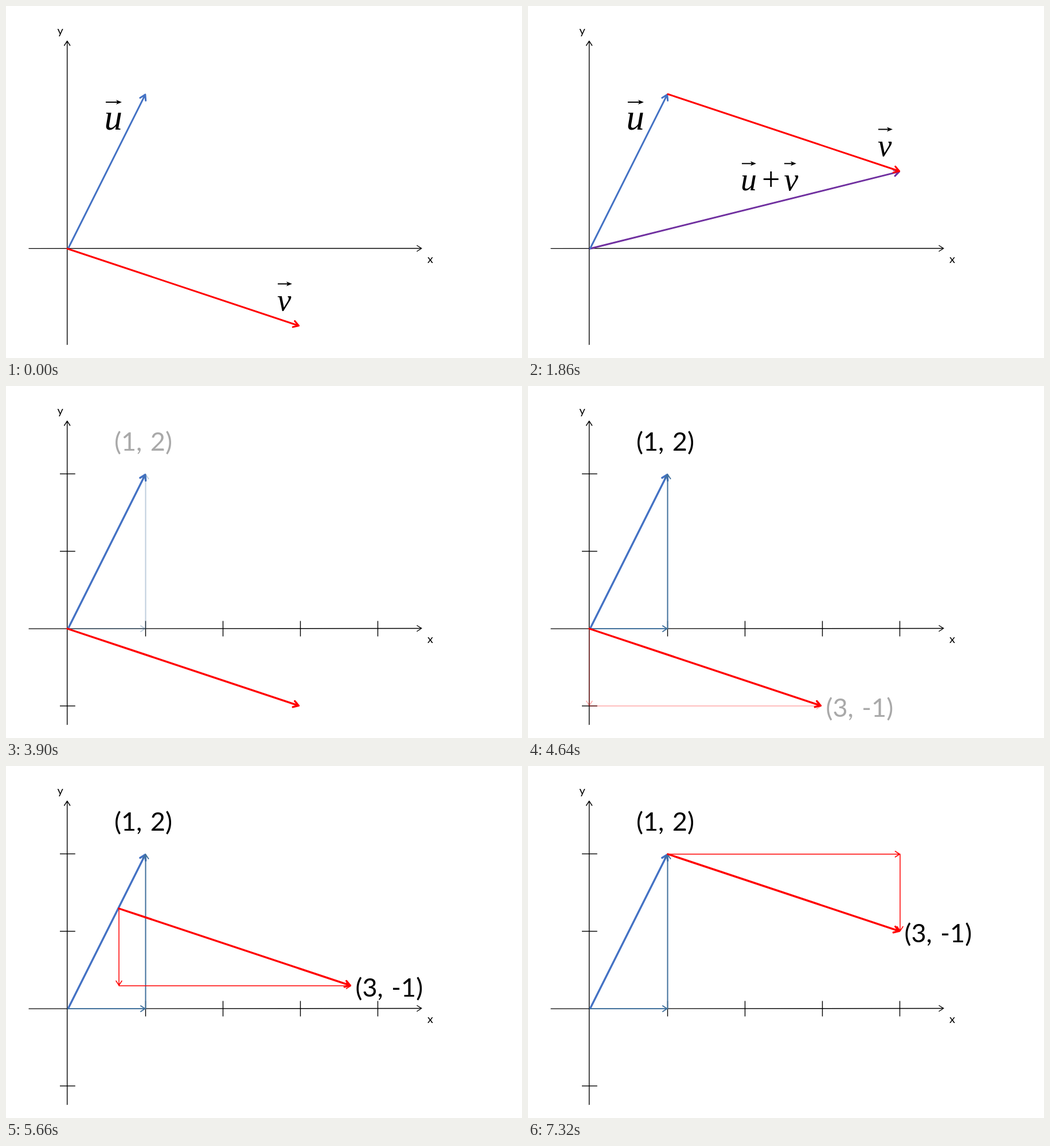
An HTML page that plays this animation: 900x615 px, repeating every 8 s.

```html
<!DOCTYPE html>
<html lang="en">
<head>
<meta charset="utf-8">
<title>Adding two vectors</title>
<style>
  html, body { margin: 0; width: 100%; height: 100%; overflow: hidden; background: #fff; }
  svg { display: block; width: 100vw; height: 100vh; }
  path { fill: none; stroke-linecap: round; stroke-linejoin: round; }
  .axis { stroke-linecap: butt; }
  .sans { font-family: Lato, "Open Sans", sans-serif; }
  .math { font-family: "Liberation Serif", serif; font-style: italic; }
  .plus { font-style: normal; }
  .pair { font-size: 45px; word-spacing: 3px; }
</style>
</head>
<body>
<svg viewBox="0 0 900 615">
  <g id="before"></g>
  <g id="after"></g>
</svg>
<script>
const LOOP = 8000, STEP = 20, FADE_STEPS = 3;
const BLUE = '#4472c4', STEEL = '#41719c', RED = '#f00', PURPLE = '#7030a0', BLACK = '#000';
const ORIGIN = [107, 424];
const U = [136.5, -270.5], V = [405, 135];
const SHIFT = [137, -270];

const add = (a, b) => [a[0] + b[0], a[1] + b[1]];

const line = (a, b, width = 1.4) =>
  `<path class="axis" stroke="${BLACK}" stroke-width="${width}" d="M${a}L${b}"/>`;

// Straight line with an open arrowhead whose outer point lands on b.
function arrow(a, b, color, width) {
  const dx = b[0] - a[0], dy = b[1] - a[1], len = Math.hypot(dx, dy);
  const at = (back, side) => [
    b[0] - (back * dx + side * dy) / len,
    b[1] - (back * dy - side * dx) / len
  ].map(n => n.toFixed(2));
  const inset = width / 2;
  const head = width > 2.5 ? [10.5, 5.5] : [8.5, 5];
  const tip = at(inset, 0);
  return `<path stroke="${color}" stroke-width="${width}" d="M${a}L${tip}` +
    `M${at(head[0], head[1])}L${tip}L${at(head[0], -head[1])}"/>`;
}

const text = (s, x, y, cls, size) =>
  `<text class="${cls}" x="${x}" y="${y}"${size ? ` font-size="${size}"` : ''}>${s}</text>`;

// Small solid arrow above a letter.
const overArrow = (x1, x2, y) =>
  line([x1, y], [x2 - 5, y], 2) +
  `<polygon points="${x2},${y} ${x2 - 10},${y - 4} ${x2 - 7.5},${y} ${x2 - 10},${y + 4}"/>`;

function axes(ticks) {
  const left = ticks ? 424.1 : 423.6;
  let out = arrow([40, left], [725.5, 423.5], BLACK, 1.4) +
    arrow([106.7, 591.5], [106.7, 60.5], BLACK, 1.4) +
    text('y', 89.4, 50, 'sans', 20) + text('x', 735, 449.3, 'sans', 20);
  if (ticks) {
    for (let i = 1; i <= 4; i++) {
      const x = 108.5 + 135 * i;
      out += line([x, 410.5], [x, 437.5]);
    }
    for (const y of [153.5, 288.7, 559]) out += line([94, y], [120.8, y]);
  }
  return out;
}

function scene(s) {
  const shift = s.shift || [0, 0];
  const tail = add(ORIGIN, shift), tip = add(tail, V);
  const uTip = add(ORIGIN, U);
  const bold = s.ticks ? 3.4 : 3;
  let out = '<rect width="900" height="615" fill="#fff"/>' + axes(s.ticks);

  if (s.sum) out += arrow([108, 424], add(add(ORIGIN, SHIFT), V), PURPLE, 3);
  out += arrow([108.5, 423.5], uTip, BLUE, bold);

  if (s.uParts) {
    const corner = [uTip[0], ORIGIN[1]];
    out += arrow([108, 424], corner, STEEL, 2) + arrow(corner, uTip, STEEL, 2) +
      text('(1, 2)', 189, 112.5, 'sans pair');
  }
  if (s.vParts) {
    const { across, down } = s.vParts;
    const h = add(tail, [0, across * V[1]]), d = add(tail, [down * V[0], 0]);
    out += arrow(d, add(d, [0, V[1]]), RED, 1.5) + arrow(h, add(h, [V[0], 0]), RED, 1.5) +
      text('(3, -1)', tip[0] + 7.5, tip[1] + 18.5, 'sans pair');
  }
  out += arrow(tail, tip, RED, bold);

  if (!s.ticks) {
    const [x, y] = shift;
    out += text('u', 171.5, 215.5, 'math', 63) + overArrow(174, 202, 168) +
      text('v', 473 + x, 532 + y, 'math', 55) + overArrow(474 + x, 499 + x, 485.5 + y);
  }
  if (s.sumLabel) {
    out += text('u', 371, 321.5, 'math', 56) + overArrow(373, 398, 275.3) +
      text('+', 408, 321.5, 'math plus', 56) +
      text('v', 446.5, 321.5, 'math', 56) + overArrow(447, 468, 275.3);
  }
  return out;
}

const below = { across: 1, down: 0 };
const split = { ticks: true, uParts: true, vParts: below };
const scenes = [
  [0, {}],
  [500, { shift: [75, -147] }],
  [740, { shift: SHIFT }],
  [1580, { shift: SHIFT, sum: true }],
  [1820, { shift: SHIFT, sum: true, sumLabel: true }],
  [2860, { ticks: true }],
  [3900, { ticks: true, uParts: true }],
  [4640, split],
  [5380, { ...split, shift: [40, -77] }],
  [5620, { ...split, shift: [90, -175] }],
  [5860, { ...split, shift: SHIFT }],
  [6600, { ...split, shift: SHIFT, vParts: { across: 0, down: 0 } }],
  [7040, { ...split, shift: SHIFT, vParts: { across: 0, down: 0.5 } }],
  [7280, { ...split, shift: SHIFT, vParts: { across: 0, down: 1 } }]
].map(([start, state]) => ({ start, markup: scene(state) }));

const before = document.getElementById('before');
const after = document.getElementById('after');
let shown = -1;

function draw(t) {
  let i = scenes.length - 1;
  while (scenes[i].start > t) i--;
  if (i !== shown) {
    before.innerHTML = i ? scenes[i - 1].markup : '';
    after.innerHTML = scenes[i].markup;
    shown = i;
  }
  const step = Math.floor((t - scenes[i].start) / STEP) + 1;
  after.setAttribute('opacity', i ? Math.min(1, step / FADE_STEPS) : 1);
}

const began = performance.now();
function tick() {
  draw((performance.now() - began) % LOOP);
  requestAnimationFrame(tick);
}
tick();
</script>
</body>
</html>
```
